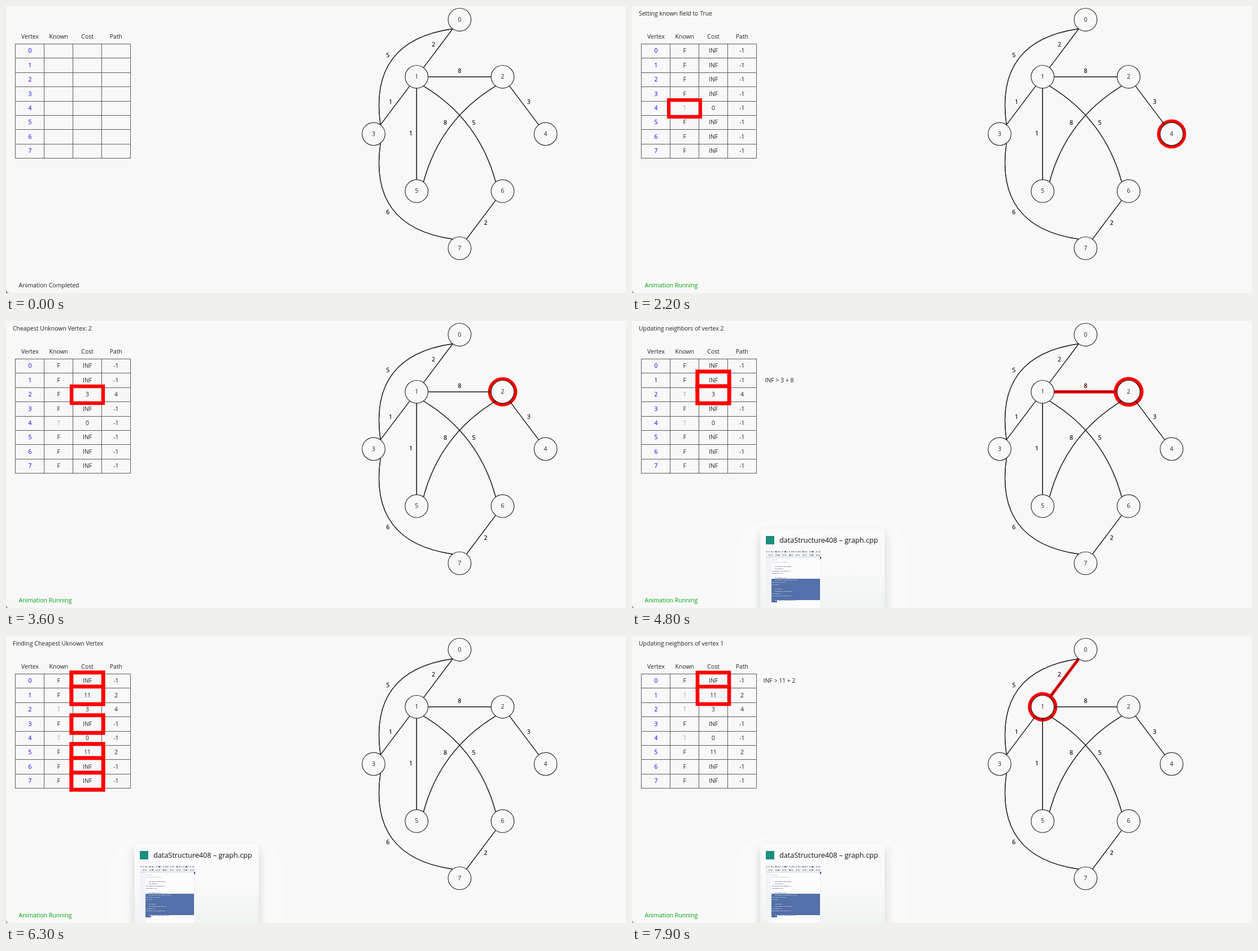
An HTML page with a canvas that plays this animation: 1098 px wide and 510 px high, repeating every 8000 ms.

```html
<!DOCTYPE html>
<html lang="en">
<head>
<meta charset="utf-8">
<title>Shortest paths</title>
<style>
html, body { margin: 0; width: 1098px; height: 510px; overflow: hidden; background: #f8f8f8; }
canvas { display: block; }
</style>
</head>
<body>
<canvas width="1098" height="510"></canvas>
<script>
const ctx = document.querySelector('canvas').getContext('2d');
const LOOP = 8000, START = 1000, STEP = 510, POPUP = 4200;
const RADIUS = 20.3, INK = '#222', RED = '#f00', PAPER = '#f8f8f8';

const nodes = [[2, 0], [1, 1], [3, 1], [0, 2], [4, 2], [1, 3], [3, 3], [2, 4]]
  .map(([x, y]) => [651 + 76.15 * x, 24.3 + 101.55 * y]);

// from, to, weight, bend; the label sits on the left of the direction
const edges = [
  [1, 0, 2, 0], [3, 0, 5, .5], [1, 2, 8, 0], [3, 1, 1, 0], [5, 1, 1, 0],
  [1, 6, 5, .2], [2, 4, 3, 0], [5, 2, 8, .2], [6, 7, 2, 0], [7, 3, 6, .5]
];

const finding = cost => ({ msg: 'Finding Cheapest Uknown Vertex', cost });
const cheapest = v => ({ msg: 'Cheapest Unknown Vertex: ' + v, cost: [v], node: v });
const marking = v => ({ msg: 'Setting known field to True', known: v, node: v });
const updating = (v, to, more) => ({ msg: 'Updating neighbors of vertex ' + v, node: v, to, ...more });
const compare = (v, to, sum) => updating(v, to, { cost: [v, to], note: 'INF > ' + sum });

const steps = [
  finding([0, 1, 2, 3, 4, 5, 6, 7]), cheapest(4), marking(4), compare(4, 2, '0 + 3'),
  finding([0, 1, 2, 3, 5, 6, 7]), cheapest(2), marking(2), compare(2, 1, '3 + 8'),
  updating(2, 4, { known: 4, note: 'Vertex 4 known', noteX: 296.5 }), compare(2, 5, '3 + 8'),
  finding([0, 1, 3, 5, 6, 7]), cheapest(1), marking(1), compare(1, 0, '11 + 2')
];
const knownFrom = { 4: 2, 2: 6, 1: 12 };
const costFrom = { 2: [4, '3', '4'], 1: [8, '11', '2'], 5: [10, '11', '2'] };

const baseline = v => 83.4 + 25.4 * v;

function text(str, x, y, color = INK, align = 'center', size = 10.45) {
  ctx.font = size + 'px "Open Sans", sans-serif';
  ctx.textAlign = align;
  ctx.fillStyle = color;
  ctx.fillText(str, x, y);
}

function rect(x, y, w, h, color) {
  ctx.fillStyle = color;
  ctx.fillRect(x, y, w, h);
}

function roundRect(x, y, w, h, r, fill) {
  ctx.beginPath();
  ctx.roundRect(x, y, w, h, r);
  ctx.fillStyle = fill;
  ctx.fill();
}

function row(v, n) {
  if (n < 0) return [v, '', '', ''];
  const [from, cost, path] = costFrom[v] || [Infinity];
  const done = n >= from;
  return [v, n >= knownFrom[v] ? 'T' : 'F', done ? cost : v === 4 ? '0' : 'INF', done ? path : '-1'];
}

function cell(col, v, str, glow) {
  const top = i => 67.5 + Math.round(25.4 * i);
  const x = 16.5 + 51 * col, y = top(v), h = top(v + 1) - y;
  if (glow) {
    const g = glow + .5;
    rect(x - g, y - g, 51 + 2 * g, h + 2 * g, RED);
    rect(x + .8, y + .8, 49.4, h - 1.6, PAPER);
  } else {
    ctx.strokeStyle = '#5c5c5c';
    ctx.lineWidth = 1;
    ctx.strokeRect(x, y, 51, h);
  }
  text(str, 42.5 + 50.8 * col, baseline(v), col === 0 ? '#00f' : str === 'T' ? '#aaa' : INK);
}

function table(n, step, glow) {
  ['Vertex', 'Known', 'Cost', 'Path'].forEach((s, i) => text(s, 42.5 + 50.8 * i, 58.3));
  const lit = [];
  for (let v = 0; v < 8; v++) row(v, n).forEach((str, col) => {
    const on = col === 1 ? step.known === v : col === 2 && step.cost?.includes(v);
    if (on) lit.push([col, v, str, glow]);
    else cell(col, v, str);
  });
  lit.forEach(args => cell(...args));
}

function disc(x, y, r, fill) {
  ctx.beginPath();
  ctx.arc(x, y, r, 0, 7);
  ctx.fillStyle = fill;
  ctx.fill();
}

function node(v, glow) {
  const [x, y] = nodes[v];
  if (glow) disc(x, y, RADIUS + glow + .5, RED);
  disc(x, y, RADIUS, PAPER);
  ctx.strokeStyle = INK;
  ctx.lineWidth = 1.1;
  ctx.stroke();
  text(v, x, y + 3.3);
}

function edge([a, b, weight, bend], glow) {
  const [ax, ay] = nodes[a], [bx, by] = nodes[b];
  const len = Math.hypot(bx - ax, by - ay), ux = (bx - ax) / len, uy = (by - ay) / len;
  const mx = (ax + bx) / 2, my = (ay + by) / 2, lift = bend * (len - 2 * RADIUS);
  const off = lift / 2 + 10.2;
  const draw = (width, color) => {
    ctx.beginPath();
    ctx.moveTo(ax + ux * RADIUS, ay + uy * RADIUS);
    ctx.quadraticCurveTo(mx + uy * lift, my - ux * lift, bx - ux * RADIUS, by - uy * RADIUS);
    ctx.lineWidth = width;
    ctx.strokeStyle = color;
    ctx.stroke();
    text(weight, mx + uy * off, my - ux * off + 3, color);
  };
  draw(1.4, INK);
  if (glow) draw(glow, RED);
  draw(1, INK);
}

function thumbnail() {
  rect(237, 408, 98, 102, '#f1f3f7');
  rect(247, 420, 86, 90, '#fcfcfd');
  for (let i = 0; i < 24; i++) {
    rect(238 + 4 * i, 409, 1 + i % 3, 2, i % 4 ? '#9a9ea6' : '#444');
    if (i % 3) rect(238 + 4 * i, 415, 3, 2, i % 5 ? '#a5aab3' : '#4c8c6a');
  }
  rect(237, 419, 98, 1, '#c9ced8');
  rect(333, 419, 2, 4, '#405090');
  rect(247, 458, 86, 38, '#5470a8');
  rect(247, 496, 10, 4, '#5470a8');
  ctx.setLineDash([4, 1, 7, 1, 2, 1]);
  ctx.lineWidth = 1;
  for (let i = 0; i < 19; i++) {
    if (i % 5 === 2) continue;
    const y = 424.5 + 4 * i, x = 248 + (i % 5 > 2 ? 5 : 0);
    ctx.beginPath();
    ctx.moveTo(x, y);
    ctx.lineTo(x + 10 + i * 17 % 31, y);
    ctx.strokeStyle = y > 457 ? '#a3b3d4' : i < 2 ? '#c5c8cd' : '#8a92a4';
    ctx.stroke();
  }
  ctx.setLineDash([]);
}

function popup(alpha) {
  if (alpha <= 0) return;
  ctx.save();
  ctx.globalAlpha = Math.min(1, alpha);
  const fill = ctx.createLinearGradient(0, 440, 0, 510);
  fill.addColorStop(0, '#fafafa');
  fill.addColorStop(1, '#eef4f2');
  roundRect(183, 357, 307, 220, 56, '#fafafa');
  ctx.shadowColor = 'rgba(0,0,0,.16)';
  ctx.shadowBlur = 18;
  ctx.shadowOffsetY = 8;
  roundRect(227.5, 369, 220, 160, 8, fill);
  ctx.shadowColor = 'transparent';
  rect(237, 382, 15, 15, '#1b8f80');
  text('dataStructure408 – graph.cpp', 261, 394, '#111', 'left', 12.65);
  thumbnail();
  ctx.restore();
}

function corner(color) {
  ctx.beginPath();
  ctx.moveTo(0, 504);
  ctx.quadraticCurveTo(1, 509, 6, 510);
  ctx.lineTo(0, 510);
  ctx.fillStyle = color;
  ctx.fill();
}

function draw(now) {
  const t = Math.floor(now % LOOP / 100) * 100;
  const n = Math.floor((t - START) / STEP), running = n >= 0;
  const step = steps[n] || {};
  // the highlight swells and shrinks in a triangle wave
  const phase = (t + 970) / 1450 % 1;
  const glow = 3.9 + 3.6 * Math.abs(phase - .5);

  rect(0, 0, 1098, 510, PAPER);
  text(step.msg || '', 12, 17.2, INK, 'left');
  table(n, step, glow);
  if (step.note) text(step.note, step.noteX || 261, baseline(step.to));
  nodes.forEach((_, v) => node(v, v === step.node && glow));
  for (const e of edges) {
    const ends = e.slice(0, 2);
    edge(e, ends.includes(step.node) && ends.includes(step.to) && glow);
  }
  popup((t - POPUP + 100) / 300);
  text(running ? 'Animation Running' : 'Animation Completed', 22.5, 499.7, running ? '#00a30a' : INK, 'left', 10.5);
  corner(running ? '#aaa' : '#3f8fc0');
}

const begin = performance.now();
function tick() {
  draw(performance.now() - begin);
  requestAnimationFrame(tick);
}
tick();
</script>
</body>
</html>
```
